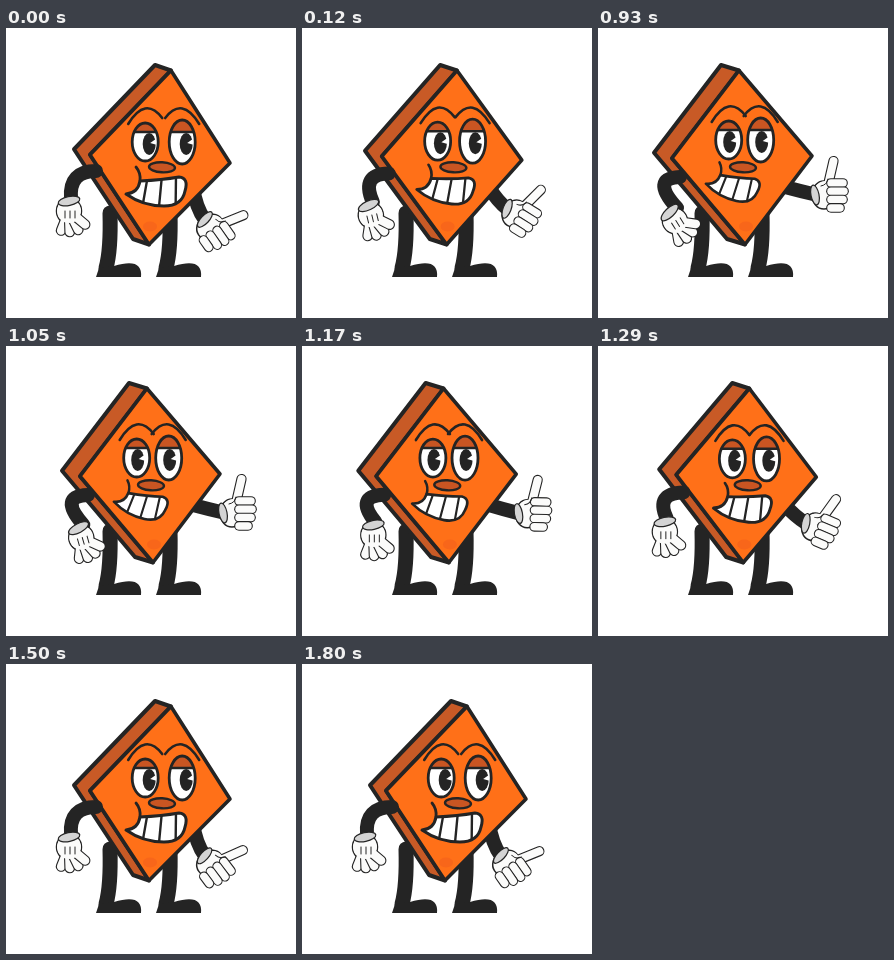
An HTML page with a canvas that plays this animation: 290 px wide and 290 px high, repeating every 1.83 s.

```html
<!DOCTYPE html>
<html lang="en">
<head>
<meta charset="utf-8">
<title>Thumbs up</title>
<style>
html, body { margin: 0; width: 100%; height: 100%; overflow: hidden; background: #fff; }
canvas { display: block; width: 290px; height: 290px; }
</style>
</head>
<body>
<canvas id="stage" width="290" height="290"></canvas>
<script>
const LOOP = 1830, STEP = 30, RAD = Math.PI / 180;
const INK = '#242424', ORANGE = '#ff7018', SIDE = '#c85a26', LID = '#c95522';
const GLOVE = '#fbfbfa', SHADE = '#d4d4d4';
const c = document.getElementById('stage').getContext('2d');
c.lineCap = c.lineJoin = 'round';

const mix = (a, b, k) => a + (b - a) * k;
const ramp = (t, from, to) => {
  const u = Math.min(1, Math.max(0, (t - from) / (to - from)));
  return u * u * (3 - 2 * u);
};
// 0 is the leaning pose, 1 is the thumbs-up pose
const pose = (t, from, to) => ramp(t, 0, 270) - ramp(t, from, to);

function paint(fill, width) {
  if (fill) { c.fillStyle = fill; c.fill(); }
  if (width) { c.lineWidth = width; c.strokeStyle = INK; c.stroke(); }
}
function poly(...points) {
  c.beginPath();
  for (const [x, y] of points) c.lineTo(x, y);
  c.closePath();
}
function oval(x, y, rx, ry, turn = 0) {
  c.beginPath();
  c.ellipse(x, y, rx, ry, turn, 0, 2 * Math.PI);
}
function line(x1, y1, x2, y2, width, color = INK) {
  c.beginPath();
  c.moveTo(x1, y1);
  c.lineTo(x2, y2);
  c.lineWidth = width;
  c.strokeStyle = color;
  c.stroke();
}
function bend(x1, y1, cx, cy, x2, y2, width) {
  c.beginPath();
  c.moveTo(x1, y1);
  c.quadraticCurveTo(cx, cy, x2, y2);
  paint(null, width);
}
function finger(x1, y1, x2, y2, width) {
  line(x1, y1, x2, y2, width + 2.2);
  line(x1, y1, x2, y2, width, GLOVE);
}
function at(x, y, turn, scale, drawPart) {
  c.save();
  c.translate(x, y);
  c.rotate(turn * RAD);
  c.scale(scale, scale);
  drawPart();
  c.restore();
}

function leg(x) {
  bend(x + 14, 185, x + 15, 222, x + 10, 240, 15);
  c.beginPath();
  c.moveTo(x, 249);
  c.lineTo(x + 3, 240);
  c.lineTo(x + 18, 238);
  c.quadraticCurveTo(x + 47, 229, x + 45, 249);
  c.closePath();
  paint(INK);
}

// A leaning diamond, pushed back along (dx, dy) for its thickness
function body(k) {
  const cx = mix(154, 144, k), cy = 129.5, lean = mix(11, -3, k);
  const dx = mix(-16, -18, k), dy = -5.5;
  const top = [cx + lean, cy - 87], bottom = [cx - lean, cy + 87];
  const right = [cx + 70, cy + lean / 2], left = [cx - 70, cy - lean / 4];
  const back = ([x, y]) => [x + dx, y + dy];
  poly(top, back(top), back(left), back(bottom), bottom, left);
  paint(SIDE, 4);
  poly(top, right, bottom, left);
  paint(ORANGE, 3.6);
  oval(bottom[0] + 1, bottom[1] - 18, 7, 5);
  paint('#f8661a');
}

function eye(x, y, side, look) {
  const rx = 13, ry = 20.5 + side * 1.5, lidY = y - 10;
  oval(x, y, rx, ry);
  paint('#fff');
  c.save();
  c.clip();
  const px = x + look, py = y + 2;
  oval(px, py, 6.5, 11);
  paint(INK);
  poly([px + 1, py - 1], [px + 8, py - 6], [px + 8, py + 1]);
  paint('#fff');
  c.fillStyle = LID;
  c.fillRect(x - rx, y - ry, 2 * rx, ry - 10);
  line(x - rx, lidY, x + rx, lidY, 2.5);
  c.restore();
  oval(x, y, rx, ry);
  paint(null, 2.8);
  bend(x - side * 17, y - 24, x, y - 46, x + side * 17, y - 18, 2.6);
}

function mouth() {
  const shape = new Path2D('M-18-10Q4-11 21-14Q31-13 27 0Q24 15 6 15Q-15 15-32 3Q-20 2-18-10Z');
  c.fillStyle = '#fff';
  c.fill(shape);
  c.save();
  c.clip(shape);
  for (let x = -10; x < 25; x += 14) line(x, -16, x - 4 + x / 5, 18, 2.4);
  c.restore();
  c.lineWidth = 3;
  c.strokeStyle = INK;
  c.stroke(shape);
  bend(-22, -24, -17, -18, -18, -10, 2.8);
}

function face(k, smile) {
  const x = mix(156, 145, k);
  for (const side of [-1, 1]) {
    eye(x + 1.7 + side * mix(18.5, 16, k), mix(114, 112, k), side, mix(4, 1, k));
  }
  oval(x, 139.3, 13, 5, 0.05);
  paint(LID, 2.4);
  at(mix(152, 136, smile), mix(163, 159, smile), 12 * smile, mix(1, 0.88, smile), mouth);
}

function leftArm(k, reach, curl) {
  const x = mix(63, 77, reach), y = mix(183, 193, reach);
  bend(mix(90, 82, k), mix(143, 149, k), mix(63, 52, k), mix(143, 150, k), x + 2, y - 13, 14);
  at(x, y, -32 * curl, 1, () => {
    oval(0, 0, 12.5, 13);
    paint(GLOVE, 1.5);
    for (let i = 0; i < 4; i++) {
      const a = (112 - 24 * i) * RAD, dx = Math.cos(a), dy = Math.sin(a);
      finger(9 * dx, 9 * dy, 21 * dx, 21 * dy, 8.5);
    }
    oval(0, 0, 12, 12);
    paint(GLOVE);
    for (const dx of [-4, 1, 6]) line(dx, 0, dx, 7, 1);
    oval(0, -10, 11, 4.5, -0.2);
    paint(SHADE, 1.2);
  });
}

function rightArm(k, settle) {
  const x = mix(208, 230, k), y = mix(201, 165, k);
  bend(187, 159, mix(190, 202, k), mix(180, 163, k), x - mix(9, 15, k), y - mix(9, -1, k), 14);
  at(x, y, mix(55, 0, k) - 2 * settle, 1, () => {
    oval(-4, 2, 12, 14);
    paint(GLOVE, 1.5);
    finger(0, -8, 5.5, -32, 8);
    oval(-3, 0, 11, 12);
    paint(GLOVE);
    for (let i = 0; i < 4; i++) {
      const fy = -10 + 8.3 * i;
      finger(3, fy, 16 - (i - 1) ** 2, fy, 7.5);
    }
    bend(-7, -7, -1, -8, 0, -14, 1);
    oval(-13, 2, 4, 10, -0.2);
    paint(SHADE, 1.2);
  });
}

function draw(t) {
  const k = pose(t, 1140, 1470);
  c.fillStyle = '#fff';
  c.fillRect(0, 0, 290, 290);
  leg(90);
  leg(150);
  rightArm(k, ramp(t, 1140, 1470) - ramp(t, 1470, 1800));
  body(k);
  face(k, pose(t, 1060, 1450));
  leftArm(k, pose(t, 930, 1480), pose(t, 930, 1170));
}

function tick() {
  const t = performance.now() % LOOP;
  draw(Math.floor(t / STEP) * STEP);
  requestAnimationFrame(tick);
}
tick();
</script>
</body>
</html>
```
